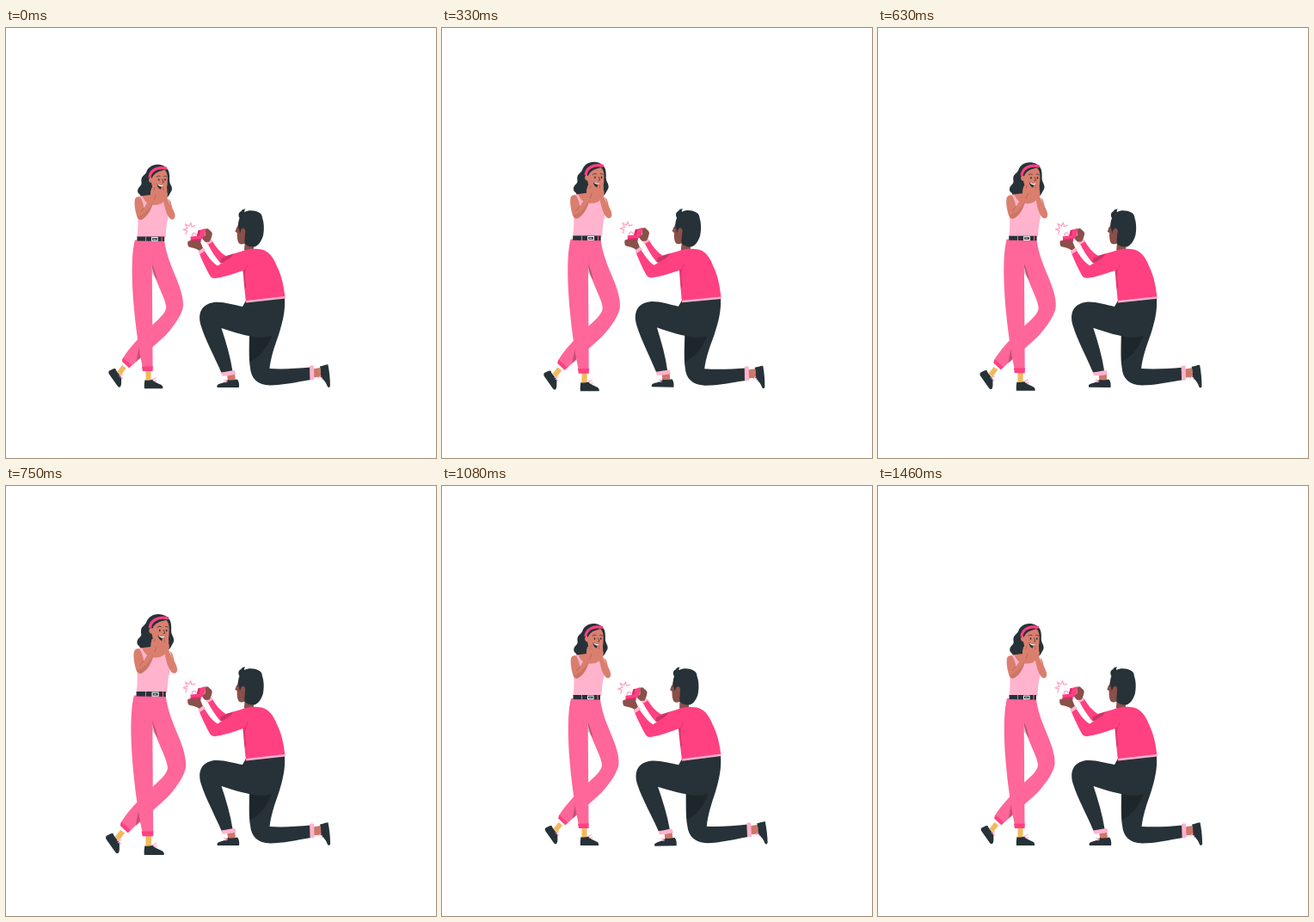
Animation, 500 px wide and 500 px high, one loop 1.5 s. Source, as an HTML page:

```html
<!DOCTYPE html>
<html lang="en">
<head>
<meta charset="utf-8">
<title>Proposal</title>
<style>
  html, body { margin: 0; width: 100%; height: 100%; overflow: hidden; background: #fff; }
  svg { display: block; width: 100%; height: 100%; }
  .dark { fill: #263238; }
  .hot { fill: #ff4081; }
  .pants { fill: #ff669a; }
  .light { fill: #ffb3cd; }
  .skin { fill: #da7f6e; }
  .brown { fill: #8a5049; }
  .ankle { fill: #cf7669; }
  .shade { fill: #000; opacity: .22; }
  .sock { fill: #f2b95c; }
  .line { fill: none; stroke: #ffa0c4; stroke-width: 1.2; stroke-linecap: round; stroke-linejoin: round; }
  .lace { stroke-width: 1; }
  .ink { fill: none; stroke: #263238; stroke-width: .7; stroke-linecap: round; }
</style>
</head>
<body>
<svg viewBox="0 0 500 500">
  <g id="woman">
    <!-- back hair -->
    <path class="dark" d="M176 160C169.500 160 165 164 163.500 168C162.500 172 158 173 157.500 177C157 181 159 182 156 185C152.500 188 152.500 192 155 194C157 195.500 156 197.500 160 198L184 199C189.500 198 189.500 194 191.500 191.500C194.500 187 191 184 190 180C189.500 177 190.500 173 189 168C187 162.500 181.500 160 176 160Z"/>
    <!-- back leg -->
    <path class="pants" d="M166 248L184 248C186 264 192 277 198 292C203 304 206 315 205.500 323C205 331 197 344 185 357C171 370 157 381 145 393L135.500 384C144 370 156 358 171 344C180 336 186 330 186 324C185 313 173 295 169 275Z"/>
    <path class="shade" d="M169.500 274C173 282 174.500 287 175.500 293L169.500 285Z"/>
    <path class="shade" d="M155 369L157 383L151.500 387.500Z"/>
    <path class="hot" d="M136.500 382.500L146 391L143.500 394.500L135 386.500Z"/>
    <path class="sock" d="M135.500 391L140 394.500L134 402.500L129.500 398.500Z"/>
    <path class="dark" d="M120.500 397.500C123 396.500 125 394.500 127.500 395C129 399.500 133 402 134.500 405C134 409 135 413 133.500 415.500C132.500 416.800 131 416.500 130 415L120.500 401.500C119.500 400 119.500 398.500 120.500 397.500Z"/>
    <path class="line lace" d="M132 403L136 402M133 404.500L136 406"/>
    <!-- front leg -->
    <path class="sock" d="M162.500 396L168.500 396L168.500 410L162.500 410Z"/>
    <path class="dark" d="M161.500 408C164 409 167 408.500 170 407.500C173 411 177 412 180 413.500C182 414.500 182.500 416.500 182 418L161 418C160.500 414 161 411 161.500 408Z"/>
    <path class="line lace" d="M170 407.500L174 405.500M171.500 409L175 409"/>
    <path class="pants" d="M150 247L176 247C172 258 169.500 266 169.700 278L170.500 394L159 394C153 366 148 325 147 295C146.500 274 147 259 150 247Z"/>
    <path class="hot" d="M158 392.500L170.800 392.500L170.500 398L159 398Z"/>
    <!-- top -->
    <path class="skin" d="M169 187L181 187L182 198L188 202L185 215L160 215L156 196.500L168 195Z"/>
    <path class="light" d="M156 197L158.500 196.500C161 202 164 205 168 206C174 207 179 207 183 203L183.500 199L185 200C188 210 189 218 188 223C186 230 186 237 185.500 244L152.500 244C154 233 154 222 152 211Z"/>
    <path class="dark" d="M152.500 243L184 243L184 248.500L152.500 248Z"/>
    <path d="M162.500 243V248.300M181 243V248.500" stroke="#ff669a" stroke-width="1"/>
    <rect x="169.500" y="244" width="6.500" height="3.700" fill="#263238" stroke="#fff" stroke-width="1"/>
    <path d="M171 245.900H174" stroke="#fff" stroke-width=".7"/>
    <!-- head -->
    <path class="skin" d="M169.500 174C170 168 176 165.500 184 166C187.500 169 188 174 187.500 180C187.500 188 185 194 180 194C174 194 170 188 169 181C165 181 165 173.500 169.500 175Z"/>
    <path class="dark" d="M168 173C168 168 174 164.500 186 165.500C180 168 173 167.500 169.500 176Z"/>
    <path d="M167 175C167.500 167.500 174.500 162 186.800 164.500" fill="none" stroke="#ff4081" stroke-width="3.200"/>
    <ellipse class="dark" cx="177.500" cy="177.500" rx=".8" ry="1.200"/>
    <ellipse class="dark" cx="184.800" cy="177.500" rx=".8" ry="1.200"/>
    <path class="ink" d="M175 174Q177 172.300 179 173.500M183.500 173.500Q185 172.500 186.500 174M181.700 177L183 180.500L181.500 181"/>
    <path class="dark" d="M175.500 182C178 184 181 184.500 183.500 183.500C183.500 187 182 189 179.500 188.500C177 187.500 175.500 185 175.500 182Z"/>
    <path d="M175.800 182.300C178 184 181 184.500 183.400 183.700L183 185.300C180 186 177 185 175.800 182.300Z" fill="#fff"/>
    <!-- arms -->
    <path class="skin" d="M150 200C151.500 197 155 196 156.500 198C159 203 160 207 160.500 210L168.500 197C167 192 169 188 170.500 185.500C171.500 183 173.500 183 173 186C175 184 176.500 186 175.500 189C176.500 193 174 198 172 201C169 212 165 219 159 223C156 225 153 223 152 219C150 212 149 205 150 200Z"/>
    <path class="skin" d="M180 189C180 186 181 184 182.300 185C183 182.500 185 183.500 184.800 185.500C187 185 187.500 188 187 191C188 194 188 196 187 198L191 208L188.500 200C191 201 192 205 193 210C195 214 197 218 196 221C195 224 192 224 190 222C185 216 184 206 182 199C180 196 179.500 193 180 189Z"/>
    <path d="M160.500 210L156 215M173 186L171.500 190M182.300 185L183 190M172 201L174 195" fill="none" stroke="#a85748" stroke-width=".6"/>
    <path class="shade" d="M153 220C160 218 167 212 171 202C170 212 166 219 159 223C156 225 154 223 153 220Z" style="opacity:.07"/>
  </g>
  <g id="man">
    <!-- back leg -->
    <path class="ankle" d="M356 396.500L365.500 395L366.500 405.500L357 406.500Z"/>
    <path class="dark" d="M365 393.500C368 393 371.500 391.500 374.500 391.300C376 399 377 408 377 416C376.500 418.500 374.500 418.500 373.500 416C372 411 368 408 365.800 405.500C366.500 402 366 397 365 393.500Z"/>
    <path class="line lace" d="M366 404L363.500 407M367 406L367.500 408.500"/>
    <path class="dark" d="M324 313C325 329 322 341 317 357C312 371 308 383 306.500 396C321 397 338 396 354 394.500L354.500 409C339 411.500 321 415.500 307 415.500C293 415 285 408 284 395C282 382 283 370 283 350Z"/>
    <path class="light" d="M353 393C355 392 357 392 358 393L358.500 408.500C357 409.500 355 409.500 353.500 409Z"/>
    <path class="shade" d="M283.500 358C293 361 302 360 309 358C303 374 293 384 284 388Z"/>
    <!-- front leg -->
    <path class="ankle" d="M257 401L266 400.500L267 411L258 411Z"/>
    <path class="dark" d="M258 409C261 410 265 409.500 269 408.500C271 411 271.500 414 271 418L246 418C244.500 416 246 414.500 249 413.500C253 412.500 256 411.500 258 409Z"/>
    <path class="line lace" d="M253.500 409.500L257.500 410M254.500 412L257 411.500"/>
    <path class="dark" d="M279 317L324 313C324 335 315 358 298 359C283 360 266 354 250.500 349C256 366 261 382 263.500 399L251 402C243 383 232 363 227 347C222 331 228 321 242 319C253 318 264 322 275 324Z"/>
    <path class="light" d="M250 400.500C255 400 261 398.500 266 398L267.500 402.500C262 404 257 404.500 251.500 404.500Z"/>
    <!-- far arm -->
    <path class="hot" d="M234 250L239.500 247C244 255 249 261 255.500 265L280 258L277 275L249 273C243 266 238 258 234 250Z"/>
    <path class="light" d="M232.500 249.500L238.500 245.500L240.500 248.500L234.500 252Z"/>
    <path class="shade" d="M250 268L265 262L259 270L249 275Z" style="opacity:.2"/>
    <!-- ring box -->
    <path class="hot" d="M223.500 235.500L232 233L230.500 244.500L220.500 247.500Z"/>
    <path d="M223.500 235.500L226 234.800L223.500 246.500L220.500 247.500Z" fill="#d92a6b"/>
    <path class="hot" d="M214.500 242.500L226 241.500L226.500 248.500L215 249.500Z"/>
    <path d="M214.500 246L226.500 245L226.500 248.500L215 249.500Z" fill="#d92a6b"/>
    <path class="line" d="M216.500 241.500C216 238 220.500 237 221 240.500"/>
    <path class="brown" d="M231.500 234.500C233 232.500 235.500 233 236.500 235C239 236.500 240.500 238.500 239.500 241C239 244 238 246 236.500 248.500L232 249C230 247 228 246 228.500 244C229 242.500 231 243 231.500 241Z"/>
    <path class="brown" d="M211.500 248C214 246.500 217 248 221 247.500C224 246.500 226 247 226.500 250L229 256L225 259C221 256 216 255.500 212.500 254.500C211 252.500 211 250 211.500 248Z"/>
    <path class="line" d="M209 240L210.500 236L206 234.500L211 233L208.500 228L213 230.500L214.800 226.500L216 231L219.800 230"/>
    <!-- head -->
    <path class="brown" d="M270 228L268.500 232L266.300 236.500L268.800 238.500C268.500 243 269 248 271 250.500C273 252 275 251.500 277.500 250.500L277 258C280 261 285 260 288 257L288 232Z"/>
    <path class="dark" d="M271.500 221C269.500 217.500 270.500 214 273.500 213C274 211 276.500 210.300 278.500 210.500C276.800 212 277 213.200 277.500 214C281 211.500 289 211.500 294 214.500C297 216 298 218.500 298 221C300.200 227 300.200 235 299 241C297.500 247 294 252.500 289.500 254.300C285 255.200 280 253.500 277.500 250.500C277 246 278 242 278 239C279 235 277 232 275 233C273 234 272.500 237 272 239L270.500 232C269.500 229 270 225 271.500 221Z"/>
    <path class="brown" d="M273 236C274 232.500 278 233 278 236.500C278 240 275.500 241.500 274 240Z"/>
    <path class="ink" d="M268 233L270 232.500"/>
    <!-- sweater -->
    <path class="hot" d="M277 258.500C284 256.500 291 256.500 297 257.500C306 259.500 311 267 315 277C321 289 323 301 324.500 313.500L279 319C278 309 277 300 275.500 282C264 286 254 289.500 244 291C240 291.500 238 290 236.500 287C232 279 228 270 224.500 261.500L230 258C235 266 240 273 246 276.500C255 271 266 264 277 258.500Z"/>
    <path class="light" d="M223.500 260L229.500 255.500L232 258.500L225.500 263Z"/>
    <path class="light" d="M279.500 317L324.300 312L324.500 314.500L279 319.500Z"/>
    <path class="shade" d="M275.500 282L279 281C277 287 278 294 279.500 300L277.300 304Z" style="opacity:.15"/>
    <path d="M275.500 282C278 281.500 280 279 281 275" fill="none" stroke="#c93268" stroke-width=".6"/>
  </g>
</svg>
<script>
  const LOOP = 1500, LEAD = 15;
  const woman = document.getElementById('woman');
  const man = document.getElementById('man');

  // Linear keyframes: [position, value] pairs over one loop
  const beat = [[0, 1], [.1, 1.096], [.3, 1], [.4, 1], [.5, 1.096], [.6, 1], [1, 1]];
  const sway = [[0, 0], [.25, 1], [.75, -1], [1, 0]];

  function at(keys, p) {
    const i = keys.findIndex(k => k[0] > p);
    const [p0, v0] = keys[i - 1], [p1, v1] = keys[i];
    return v0 + (v1 - v0) * (p - p0) / (p1 - p0);
  }

  function draw(ms) {
    const p = (ms + LEAD) % LOOP / LOOP;
    woman.setAttribute('transform', `translate(163 289) scale(${at(beat, p)}) translate(-163 -289)`);
    man.setAttribute('transform', `rotate(${at(sway, p)} 291.5 314.5)`);
  }

  const start = performance.now();
  function tick() {
    draw(performance.now() - start);
    requestAnimationFrame(tick);
  }
  tick();
</script>
</body>
</html>
```
